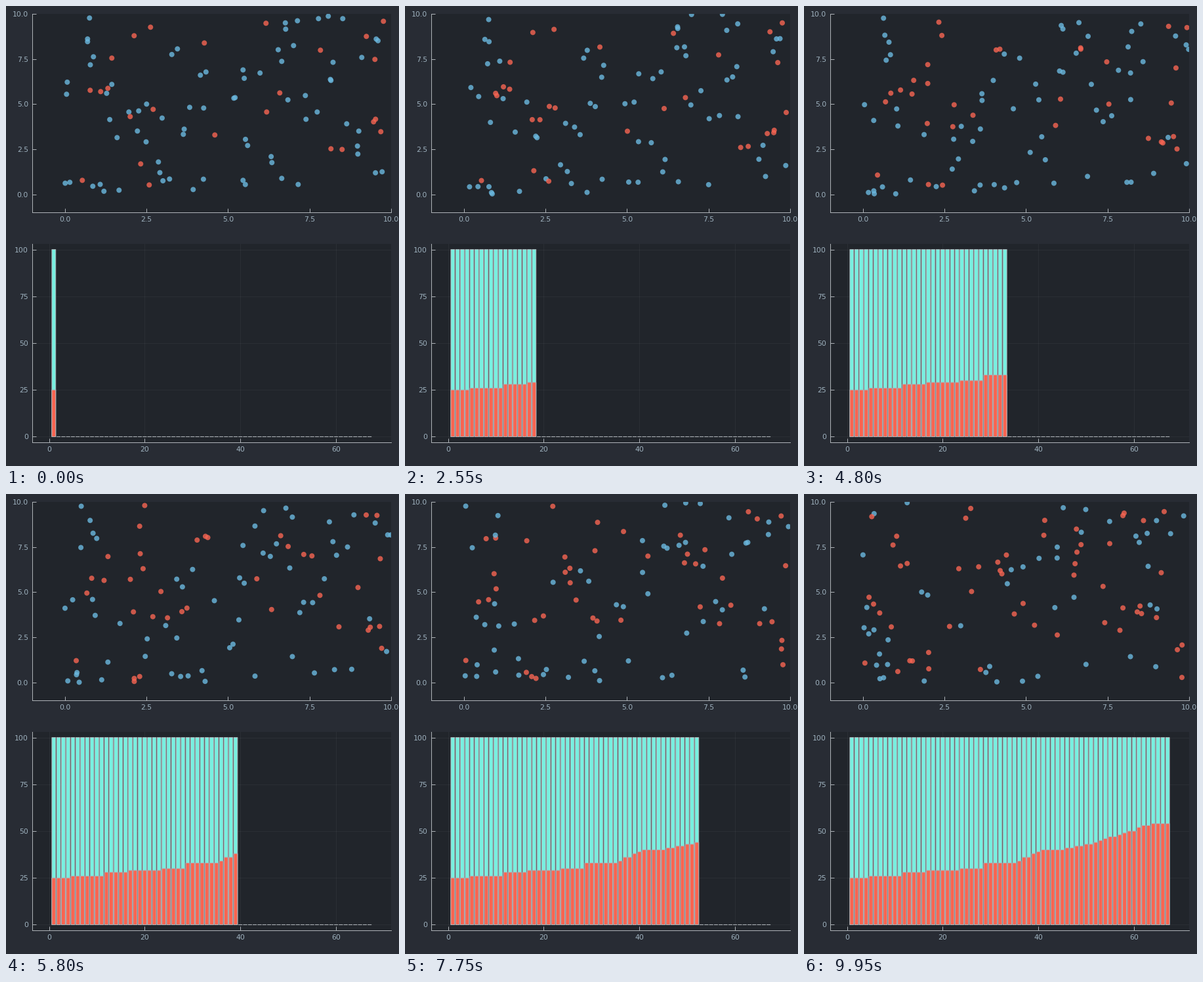
Write a matplotlib script that moves like this. It is 599 px wide and 700 px high and loops after 10000 ms.

```python
import numpy as np
import matplotlib.pyplot as plt
from matplotlib.animation import FuncAnimation

W, H, DPI = 599, 700, 72  # at 72 dpi one point is one pixel
FRAMES, INTERVAL, STEPS_PER_DAY = 200, 50, 3
DAYS, PEOPLE, SIZE = 67, 100, 10.0
JITTER = 0.0011

BACK, PANEL = "#282c34", "#21252b"
TEXT, LINE = "#9eb1be", "#adb2b7"
BLUE, RED = "#6bb9e0", "#f86553"
BAR_BLUE, BAR_RED = "#77f0e0", "#fa6450"

# Starting places in stage pixels; most healthy dots have a companion nearby
HEALTHY = [
    (127, 18), (124, 54), (133, 77), (161, 119), (92, 134), (261, 65),
    (296, 105), (361, 97), (426, 35), (438, 60), (420, 84), (476, 19),
    (513, 19), (564, 50), (542, 78), (495, 113), (456, 136), (474, 161),
    (519, 179), (536, 225), (573, 252), (347, 140), (301, 155), (214, 149),
    (187, 161), (169, 200), (200, 190), (270, 195), (368, 212), (405, 238),
    (420, 262), (361, 265), (232, 237), (249, 263), (285, 279), (172, 280),
    (132, 274), (97, 268),
]
INFECTED = [
    (195, 45), (220, 32), (161, 79), (155, 125), (144, 130), (128, 128),
    (302, 56), (396, 26), (479, 67), (549, 46), (575, 23), (562, 81),
    (417, 132), (397, 161), (224, 157), (189, 168), (318, 196), (205, 240),
    (218, 272), (116, 265), (495, 217), (512, 218), (571, 191), (560, 176),
    (563, 172),
]

# Day of each new case
NEW_CASES = [5, 12, 12, 17, 24, 29, 29, 29, 36, 37, 37, 39, 39, 40, 41,
             46, 48, 50, 52, 53, 54, 55, 57, 58, 59, 61, 61, 62, 64]


def to_data(pixels):
    x, y = np.array(pixels, float).T + 0.3
    return np.column_stack([(x - 89.73) / 49.73, (286.55 - y) / 27.45])


def reflect(pos):
    pos = np.abs(pos)
    return np.where(pos > SIZE, 2 * SIZE - pos, pos)


def starting_places(rng):
    healthy, infected = to_data(HEALTHY), to_data(INFECTED)
    count = PEOPLE - len(healthy) - len(infected)
    companions = healthy[1:count + 1] + rng.normal(0, (0.35, 0.5), (count, 2))
    return reflect(np.vstack([healthy, companions, infected]))


def simulate(counts):
    """Inertial random walk; each new case is the healthy dot nearest to a sick one."""
    rng = np.random.default_rng(7)
    pos = starting_places(rng)
    vel = np.zeros_like(pos)
    sick = np.arange(PEOPLE) >= PEOPLE - len(INFECTED)
    places, states = [], []
    for step in range(FRAMES):
        if step:
            vel += rng.normal(0, JITTER, pos.shape)
            pos = pos + vel
            vel[(pos < 0) | (pos > SIZE)] *= -1
            pos = reflect(pos)
        while sick.sum() < counts[step // STEPS_PER_DAY]:
            gaps = np.linalg.norm(pos[:, None] - pos[sick][None], axis=2).min(axis=1)
            gaps[sick] = np.inf
            sick[gaps.argmin()] = True
        places.append(pos)
        states.append(sick.copy())
    return places, states


def add_panel(top, bottom, xlim, ylim, xticks, yticks):
    left, right = 40, 587
    ax = fig.add_axes([left / W, 1 - bottom / H, (right - left) / W, (bottom - top) / H])
    ax.set(facecolor=PANEL, xlim=xlim, ylim=ylim, xticks=xticks, yticks=yticks)
    ax.set_axisbelow(True)
    ax.tick_params(direction="in", length=6, width=1, pad=6, color=LINE,
                   labelcolor=TEXT, labelsize=10.9)
    for side in ("top", "right"):
        ax.spines[side].set_visible(False)
    for side in ("left", "bottom"):
        ax.spines[side].set(color=LINE, linewidth=1)
    return ax


plt.rcParams["font.family"] = "DejaVu Sans"
fig = plt.figure(figsize=(W / DPI, H / DPI), dpi=DPI, facecolor=BACK)

field = add_panel(12, 314, (-1, 10), (-1, 10),
                  np.arange(0, 10.1, 2.5), np.arange(0, 10.1, 2.5))
chart = add_panel(362, 664, (-3.5, 71.5), (-3, 103),
                  range(0, 61, 20), range(0, 101, 25))
chart.grid(color=LINE, alpha=0.07, linewidth=1)

days = np.arange(1, DAYS + 1)
counts = len(INFECTED) + np.searchsorted(NEW_CASES, days, side="right")
places, states = simulate(counts)
palette = np.array([BLUE, RED])

dots = field.scatter(*places[0].T, s=64, c=palette[states[0].astype(int)],
                     alpha=0.8, linewidths=0)
style = dict(width=0.8, edgecolor=LINE, linewidth=1, snap=False)
everyone = chart.bar(days, np.zeros(DAYS), color=BAR_BLUE, **style)
cases = chart.bar(days, np.zeros(DAYS), color=BAR_RED, **style)


def update(frame):
    dots.set_offsets(places[frame])
    dots.set_facecolor(palette[states[frame].astype(int)])
    today = frame // STEPS_PER_DAY
    for day in range(DAYS):
        shown = day <= today
        everyone[day].set_height(PEOPLE if shown else 0)
        cases[day].set_height(counts[day] if shown else 0)
    return [dots, *everyone, *cases]


anim = FuncAnimation(fig, update, frames=FRAMES, interval=INTERVAL,
                     repeat=True, repeat_delay=0, blit=False)
plt.show()
```
